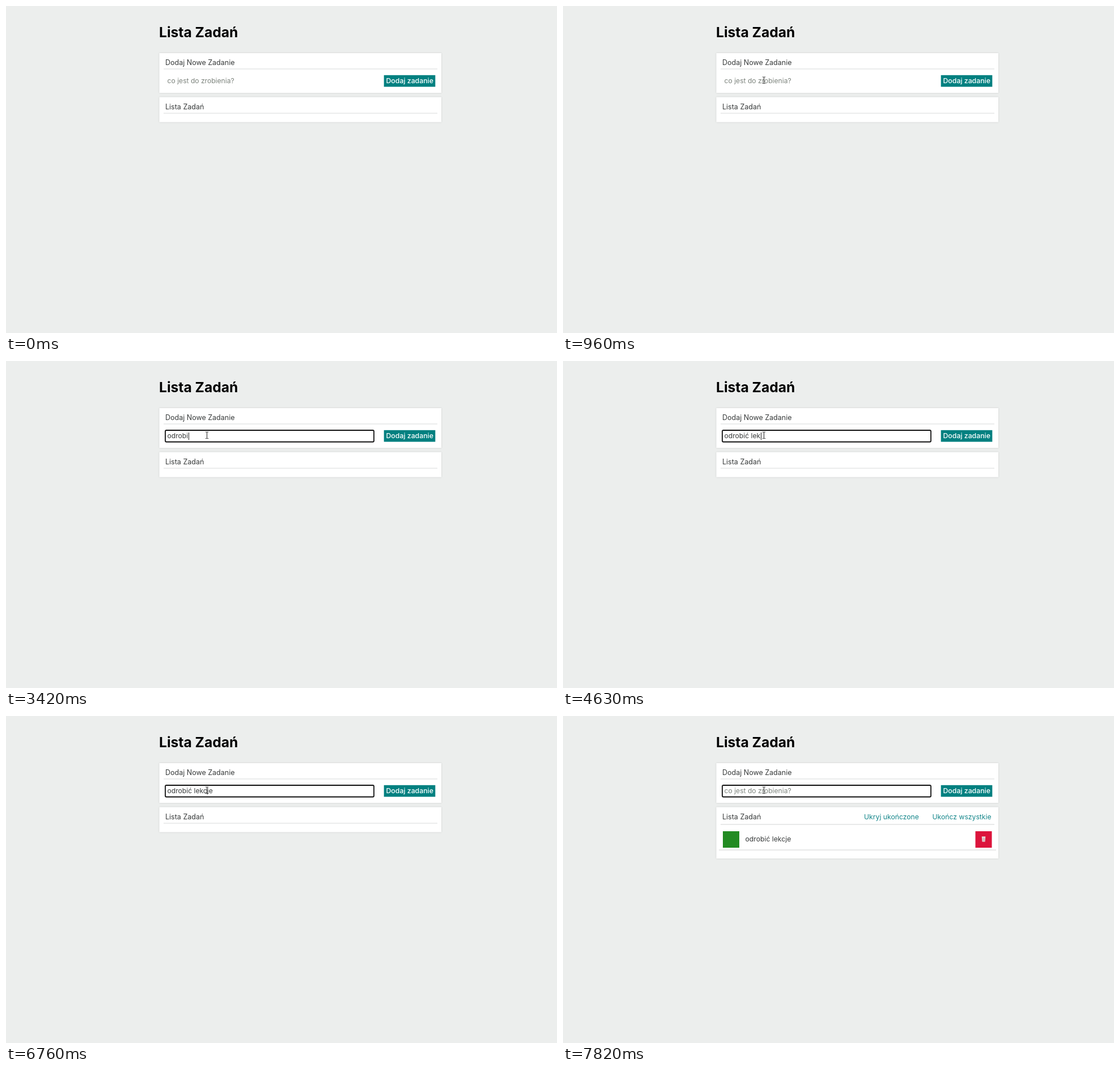
An HTML page that plays this animation: 972x576 px, repeating every 8 s.

```html
<!DOCTYPE html>
<html lang="pl">
<head>
<meta charset="utf-8">
<title>Lista Zadań</title>
<style>
  html, body { margin: 0; width: 100%; height: 100%; overflow: hidden; background: #eceeed; }
  svg { display: block; }
  text { font: 12.2px Inter, "Open Sans", sans-serif; fill: #383b3b; white-space: pre; }
  .title { font-size: 24.6px; font-weight: 700; fill: #000; }
  .heading { font-size: 12.5px; }
  .input { font-size: 12.1px; }
  .hint { fill: #7d847d; }
  .label { fill: #fff; font-size: 12.3px; font-weight: 500; }
  .link { fill: #14868a; }
  .card { fill: #fff; filter: drop-shadow(0 0 1.5px #0002); }
  .rule { stroke: #e0e2e2; stroke-width: 1.3; }
</style>
</head>
<body>
<svg width="972" height="576" viewBox="0 0 972 576">
  <text class="title" x="270" y="54.5">Lista Zadań</text>

  <rect class="card" x="270.5" y="83" width="497.5" height="70"/>
  <text class="heading" x="281" y="104">Dodaj Nowe Zadanie</text>
  <path class="rule" d="M278 110.8H761"/>
  <rect id="ring" x="281" y="122" width="368" height="20.5" rx="2" fill="none" stroke="#101010" stroke-width="1.8"/>
  <text id="hint" class="input hint" x="284.6" y="136">co jest do zrobienia?</text>
  <text id="typed" class="input" x="284.6" y="136"></text>
  <rect id="caret" y="126" width="1" height="13" fill="#222"/>
  <rect x="666.7" y="121.8" width="90.6" height="20.5" fill="#008080"/>
  <text class="label" x="670.5" y="136">Dodaj zadanie</text>

  <rect id="list" class="card" x="270.5" y="160.5" width="497.5" height="44"/>
  <text class="heading" x="281" y="181.5">Lista Zadań</text>
  <path id="listRule" class="rule" d="M278 0H761"/>
  <g id="task">
    <text class="link" x="531" y="182">Ukryj ukończone</text>
    <text class="link" x="651.5" y="182">Ukończ wszystkie</text>
    <rect x="282" y="203" width="29" height="29" fill="#228b22"/>
    <text x="321.5" y="221">odrobić lekcje</text>
    <rect x="727.5" y="203" width="29" height="29" fill="#dc143c"/>
    <path d="M738.7 212.2h6.6l-.8 9.4h-5z" fill="#e9dcdc"/>
    <path d="M740.6 214.5l.3 6M742.1 214.5v6M743.6 214.5l-.3 6" stroke="#b98f96" stroke-width=".6"/>
    <path class="rule" d="M275 236H764"/>
  </g>

  <path id="arrow" d="M0 0V15.5L3.6 12.2 6 17.6 8.4 16.5 6 11.3H11z" fill="#fff" stroke="#000" stroke-width=".9"/>
  <path id="beam" d="M-2.5-5.5H-.8L0-5 .8-5.5H2.5M0-5V5.5M-2.5 6H-.8L0 5.5 .8 6H2.5" fill="none" stroke="#222" stroke-width="1"/>
</svg>
<script>
const LOOP = 8000, FOCUS = 1090, SUBMIT = 7020;
const TASK = "odrobić lekcje";
const KEYS = [2680, 2750, 3020, 3090, 3290, 3420, 3820, 4020, 4230, 4360, 4630, 4830, 4960, 5160];
const BLINKS = [FOCUS, 1620, 2150, 5690, 6230, 6760, 7290, 7820];
const MOVE = { start: 190, step: 70, count: 11, from: [783, 492], bend: [370, 232], to: [354.5, 130.5] };

const el = id => document.getElementById(id);
const show = (id, on) => el(id).setAttribute("visibility", on ? "visible" : "hidden");
const passed = (times, t) => times.filter(x => x <= t).length;

// The pointer slows down along a quadratic curve, sampled in steps.
function drawPointer(t) {
  const step = Math.floor((t - MOVE.start) / MOVE.step);
  const left = 1 - Math.max(0, Math.min(1, step / MOVE.count));
  const q = left * left, p = 1 - q;
  const [x, y] = [0, 1].map(i => q * q * MOVE.from[i] + 2 * p * q * MOVE.bend[i] + p * p * MOVE.to[i]);
  const inField = y < 143;
  for (const id of ["arrow", "beam"]) el(id).setAttribute("transform", `translate(${x} ${y})`);
  show("arrow", step >= 0 && !inField);
  show("beam", step >= 0 && inField);
}

function drawField(t) {
  const text = t < SUBMIT ? TASK.slice(0, passed(KEYS, t)) : "";
  const typed = el("typed");
  typed.textContent = text;
  const width = text ? typed.getComputedTextLength() : 0;
  el("caret").setAttribute("x", Math.round(285 + width));
  show("caret", passed(BLINKS, t) % 2 === 1);
  show("hint", !text);
  show("ring", t >= FOCUS);
}

function drawList(t) {
  const added = t >= SUBMIT;
  el("list").setAttribute("height", added ? 90.5 : 44);
  el("listRule").setAttribute("transform", `translate(0 ${added ? 191 : 188.8})`);
  show("task", added);
}

function frame(now) {
  const t = now % LOOP;
  drawPointer(t);
  drawField(t);
  drawList(t);
  requestAnimationFrame(frame);
}
frame(performance.now());
</script>
</body>
</html>
```
